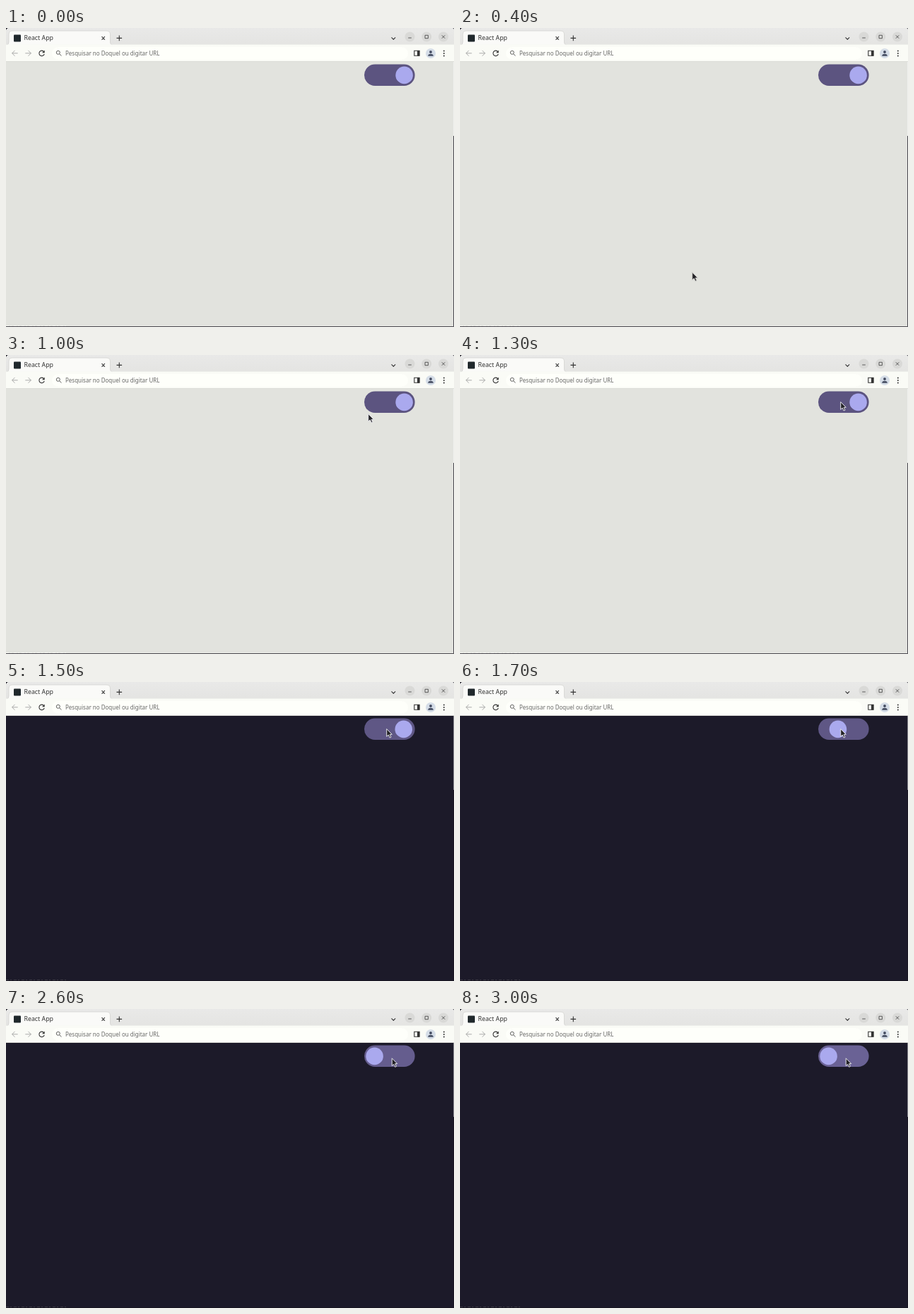
An HTML page for the animation above (3100 ms loop, 634 by 424 pixels).

```html
<!DOCTYPE html>
<html lang="pt">
<head>
<meta charset="utf-8">
<title>Toggle</title>
<style>
  html, body { margin: 0; width: 100%; height: 100%; overflow: hidden; }
  svg { display: block; width: 100%; height: 100%; }
  text { font-family: "Noto Sans", "Open Sans", sans-serif; }
  .line { fill: none; stroke: #333; stroke-width: 1.1; }
  .thin { fill: none; stroke: #444; stroke-width: .85; }
  .pale { fill: none; stroke: #aaa; stroke-width: 1; }
</style>
</head>
<body>
<svg viewBox="0 0 634 424">
  <defs>
    <linearGradient id="bar" x2="0" y2="1">
      <stop stop-color="#e9e9e8"/><stop offset="1" stop-color="#e4e4e2"/>
    </linearGradient>
  </defs>

  <rect id="page" y="48" width="634" height="376"/>
  <path id="dashes" d="M0 422.5H85" fill="none" stroke-dasharray="4 2 2 3"/>
  <path d="M633.5 153V423.5H0" fill="none" stroke="#17151f" stroke-opacity=".75"/>
  <path d="M633.5 48V153" fill="none" stroke="#fff" stroke-opacity=".45"/>

  <!-- tab strip -->
  <rect width="634" height="24" fill="url(#bar)"/>
  <path d="M0 0H3Q.6 .6 0 3Z" fill="#17151f"/>
  <path d="M634 0H632Q633.6 .4 634 2Z" fill="#55545a"/>
  <path d="M0 24.5Q4 24 4 20V9Q4 4 9 4H142Q147.5 4 147.5 9V20Q147.5 24 152 24.5Z" fill="#fafaf8" stroke="#cfcfcc" stroke-width=".7"/>
  <rect x="11" y="9.5" width="10" height="10" rx="1" fill="#20282c"/>
  <text x="25.5" y="17.4" font-size="8.8" fill="#333">React App</text>
  <path class="line" d="M135.5 12.2l4.4 4.4m0-4.4l-4.4 4.4M156.5 14.4h7.6m-3.8-3.8v7.6M545.5 13.4l2.8 2.8 2.8-2.8"/>
  <g fill="#d9d9d7">
    <circle cx="571.5" cy="12.5" r="7"/><circle cx="595.2" cy="12.5" r="7"/><circle cx="619" cy="12.5" r="7"/>
  </g>
  <path class="thin" d="M569.2 14h4.6M593 10.3h4.4v4.4H593zM616.8 10.3l4.4 4.4m0-4.4l-4.4 4.4"/>

  <!-- toolbar -->
  <rect y="23.5" width="634" height="23.5" fill="#fafbf6"/>
  <rect x="65" y="27" width="504" height="18" rx="9" fill="#fefffa"/>
  <rect y="47" width="634" height="1" fill="#dcddd8"/>
  <path class="pale" d="M16.7 35.8H8.5m4-3.9l-3.9 3.9 3.9 3.9M27.3 35.8h8.2m-4-3.9l3.9 3.9-3.9 3.9"/>
  <path class="line" d="M53.3 33.3A3.7 3.7 0 1 0 54.2 36.8"/>
  <path d="M54.7 31.6v3.7H51z" fill="#333"/>
  <g class="thin"><circle cx="73.8" cy="34.8" r="2.5"/><path d="M75.7 36.7l2.7 2.8"/></g>
  <text x="84" y="38.7" font-size="8" fill="#676767">Pesquisar no Doquel ou digitar URL</text>
  <path class="line" d="M577.8 32.3h7.2v7h-7.2z"/>
  <path d="M582 32h3.3v7.6H582z" fill="#333"/>
  <circle cx="601" cy="36" r="7" fill="#d5dde7"/>
  <g fill="#444c61">
    <circle cx="601" cy="34" r="1.9"/><path d="M597.3 39.8v-1q.5-2 3.7-2t3.7 2v1z"/>
  </g>
  <g fill="#333"><circle cx="619.8" cy="32.4" r="1"/><circle cx="619.8" cy="35.9" r="1"/><circle cx="619.8" cy="39.4" r="1"/></g>

  <!-- switch -->
  <rect id="track" x="507" y="51.5" width="71.6" height="30.5" rx="15.25"/>
  <circle id="knob" cy="66.9" r="12.3" fill="#aaa9ee"/>

  <path id="cursor" d="M-.3 -.5V10.3L2.2 8L4.1 12L5.9 11.2L4.2 7.3H7.3Z" fill="#242327"/>
</svg>
<script>
const LOOP = 3100, STEP = 100, SWITCH = 1500;
const [page, dashes, track, knob, cursor] =
  ["page", "dashes", "track", "knob", "cursor"].map(id => document.getElementById(id));

// time, x, y of the pointer tip
const path = [
  [400, 329, 347], [500, 394, 232], [600, 418, 191], [700, 459, 148],
  [800, 482, 113], [900, 496.5, 95.5], [1000, 513, 84], [1100, 527, 75],
  [1200, 536, 69], [1300, 539, 67], [1900, 539, 67], [2000, 539.5, 69],
  [2400, 546, 69.5], [2600, 546.5, 70.3]
];

function pointerAt(t) {
  const i = path.findIndex(p => p[0] > t);
  if (i < 0) return path.at(-1).slice(1);
  const [t0, x0, y0] = path[i - 1], [t1, x1, y1] = path[i];
  const k = (t - t0) / (t1 - t0);
  return [x0 + (x1 - x0) * k, y0 + (y1 - y0) * k];
}

// cubic-bezier(.25, .1, .25, 1)
function ease(p) {
  if (p <= 0 || p >= 1) return p <= 0 ? 0 : 1;
  let lo = 0, hi = 1, s = .5;
  for (let i = 0; i < 20; i++) {
    s = (lo + hi) / 2;
    const x = .75 * s * (1 - s) + s ** 3;
    if (x < p) lo = s; else hi = s;
  }
  return .3 * s * (1 - s) ** 2 + 3 * s * s * (1 - s) + s ** 3;
}

function draw(t) {
  const dark = t >= SWITCH;
  page.setAttribute("fill", dark ? "#1c1a29" : "#e2e3de");
  dashes.setAttribute("stroke", dark ? "#3a3844" : "#f0f0ec");
  track.setAttribute("fill", !dark ? "#5c5480" : t < 2000 ? "#5f5785" : t < 3000 ? "#655d8e" : "#6a6295");
  knob.setAttribute("cx", dark ? 563.6 - 42 * ease((t - 1480) / 550) : 563.6);

  const visible = t >= path[0][0];
  cursor.style.display = visible ? "" : "none";
  if (visible) {
    cursor.setAttribute("transform", `translate(${pointerAt(t)})`);
    cursor.setAttribute("stroke", t < 1000 ? "#c9c9c6" : "#e4e4ea");
  }
}

const start = performance.now();
function tick() {
  const t = (performance.now() - start) % LOOP;
  draw(Math.floor(t / STEP) * STEP);
  requestAnimationFrame(tick);
}
tick();
</script>
</body>
</html>
```
